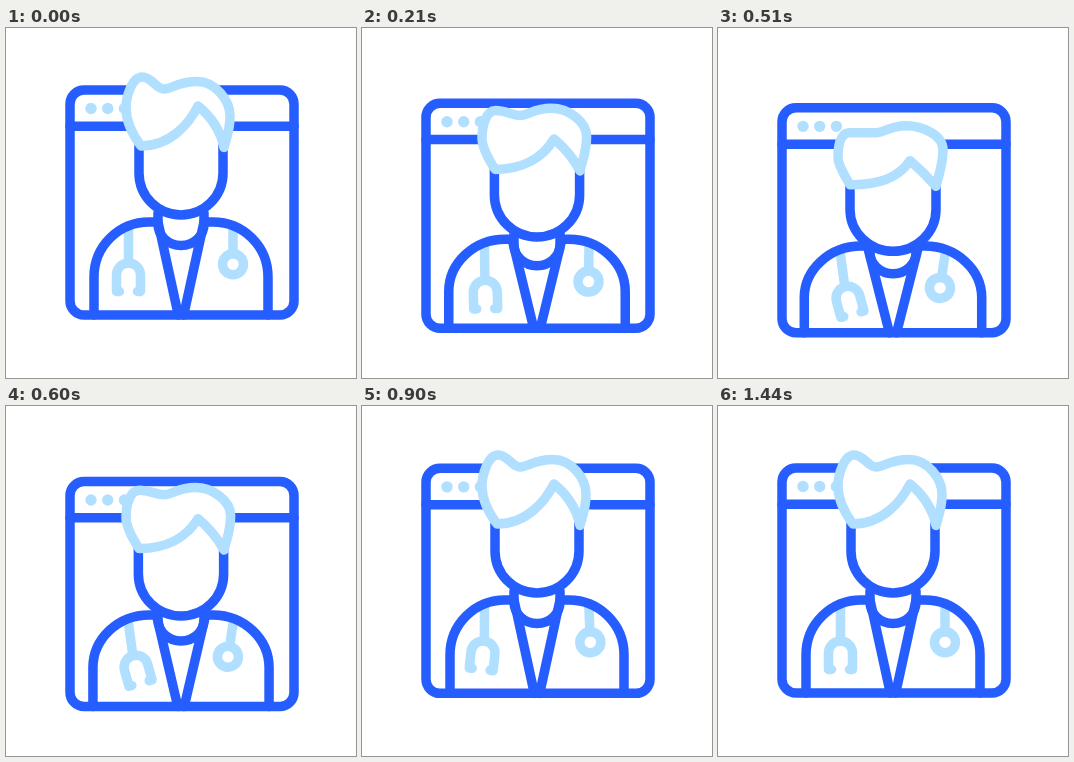
Recreate the animation shown at these times as an HTML page with a canvas. Size 350x350 px, loop 1.55 s.

```html
<!DOCTYPE html>
<html lang="en">
<head>
<meta charset="utf-8">
<title>Online doctor</title>
<style>
  html, body { margin: 0; width: 100%; height: 100%; overflow: hidden; background: #fff; }
  canvas { display: block; }
</style>
</head>
<body>
<canvas id="stage" width="350" height="350"></canvas>
<script>
const ctx = document.getElementById('stage').getContext('2d');
const BLUE = '#265dff', LIGHT = '#b1dfff';
const LOOP = 1550, STEP = 30, LAST = 1440;

// Rises from 0 to 1 between two times, eased in and out.
function ease(t, from, to) {
  const k = Math.min(1, Math.max(0, (t - from) / (to - from)));
  return (1 - Math.cos(Math.PI * k)) / 2;
}

// Down by one time, held, then back up.
const dip = (t, down, hold, up) => ease(t, 0, down) - ease(t, hold, up);

// Swings to one angle, across to another and back to rest.
const swing = (t, first, second) =>
  first * ease(t, 120, 560) + (second - first) * ease(t, 560, 1070) - second * ease(t, 1070, LAST);

function stroke(d, color) {
  ctx.strokeStyle = color;
  ctx.stroke(new Path2D(d));
}

function fill(d, color) {
  ctx.fillStyle = color;
  ctx.fill(new Path2D(d));
}

const circle = (x, y, r) => `M${x - r} ${y}a${r} ${r} 0 1 1 ${2 * r} 0a${r} ${r} 0 1 1 ${-2 * r} 0`;

function turn(x, y, degrees) {
  ctx.translate(x, y);
  ctx.rotate(degrees * Math.PI / 180);
}

function drawWindow(y) {
  ctx.beginPath();
  ctx.roundRect(64, 62 + y, 224, 225, 14);
  ctx.strokeStyle = BLUE;
  ctx.stroke();
  stroke(`M64 ${98.3 + y}H288`, BLUE);
  for (let i = 0; i < 3; i++) fill(circle(85 + 16.7 * i, 80.5 + y, 5.7), LIGHT);
}

function drawStethoscope(y, tube, fork, disc) {
  ctx.save();
  turn(122.5, 203 + y, tube);
  stroke('M0 -4V32', LIGHT);
  turn(0, 32, fork - tube);
  stroke('M-9 28.5H-12V12a12 12 0 0 1 24 0V28.5H9', LIGHT);
  ctx.restore();

  ctx.save();
  turn(227, 203 + y, disc);
  stroke('M0 -4V23' + circle(0, 33.3, 10.5), LIGHT);
  ctx.restore();
}

function drawTorso(y, base) {
  const u = y / 28, top = 194 + y, side = 249 + y * .85;
  const half = x => `M${x(88 - 2 * u)} ${base}V${side}
    C${x(88 - 2 * u)} ${top + 24} ${x(113 - 2 * u)} ${top} ${x(143)} ${top}
    H${x(152 - 3 * u)}L${x(172.3 - u)} ${base}`;
  stroke(half(x => x) + half(x => 350 - x), BLUE);
  stroke(`M152 ${top - 9}V${top + 2 + 5 * u}a23 21.5 0 0 0 46 0V${top - 9}`, BLUE);
}

// u lowers the face and hairline, q flattens the top of the hair.
function drawHead(u, q) {
  const left = 133 - u, right = 217 + u, low = 118 + 39 * u;
  const jaw = 145 + 36.5 * u, notch = 78 + 55 * u;
  const face = `M${left} ${low}V${jaw}A${42 + u} 42 0 0 0 ${right} ${jaw}V${low}`;
  fill(`${face}L192 ${notch}Z`, '#fff');
  stroke(face, BLUE);

  const corner = 135 - 3 * u, side = 80 + 50 * u, back = 224 + u, nape = 88 + 34 * u;
  const tuft = 49 + 56 * q, valley = 61 + 44 * q, crown = 53.5 + 44.5 * q;
  const hair = `M${corner} ${low}Q120 ${low - 20} 120 ${side}
    C120 ${side - 11} ${126 - 4 * q} ${tuft} ${136 - 4 * q} ${tuft}
    S150 ${valley} 158 ${valley}
    S172 ${crown} ${191 - 3 * q} ${crown}
    S${back} ${nape - 15} ${back} ${nape}
    S221 ${low - 11} 218 ${low + 1.5}
    Q${213 - 7 * u} ${95 + 50 * u} 192 ${notch}
    C${183 - 3 * u} ${notch + 18} ${164 - 4 * u} ${low} ${corner} ${low}Z`;
  fill(hair, '#fff');
  stroke(hair, LIGHT);
}

function draw(t) {
  const bounce = -.08 * ease(t, 600, 770) + .22 * ease(t, 770, 1090) - .14 * ease(t, 1090, LAST);
  const screen = 21 * dip(t, 360, 360, 950);
  const torso = 28 * dip(t, 365, 414, 802) + 5 * bounce;
  const head = 1.05 * dip(t, 385, 464, 776);

  ctx.fillStyle = '#fff';
  ctx.fillRect(0, 0, 350, 350);
  ctx.lineCap = ctx.lineJoin = 'round';
  ctx.lineWidth = 9.5;
  drawWindow(screen);
  drawStethoscope(torso, swing(t, -8, 3), swing(t, -16, 14), swing(t, 9, -6));
  drawTorso(torso, 287 + screen);
  drawHead(head + .15 * bounce, head + bounce);
}

const start = performance.now();
function tick() {
  const t = (performance.now() - start) % LOOP;
  draw(Math.min(Math.floor(t / STEP) * STEP, LAST));
  requestAnimationFrame(tick);
}
tick();
</script>
</body>
</html>
```
